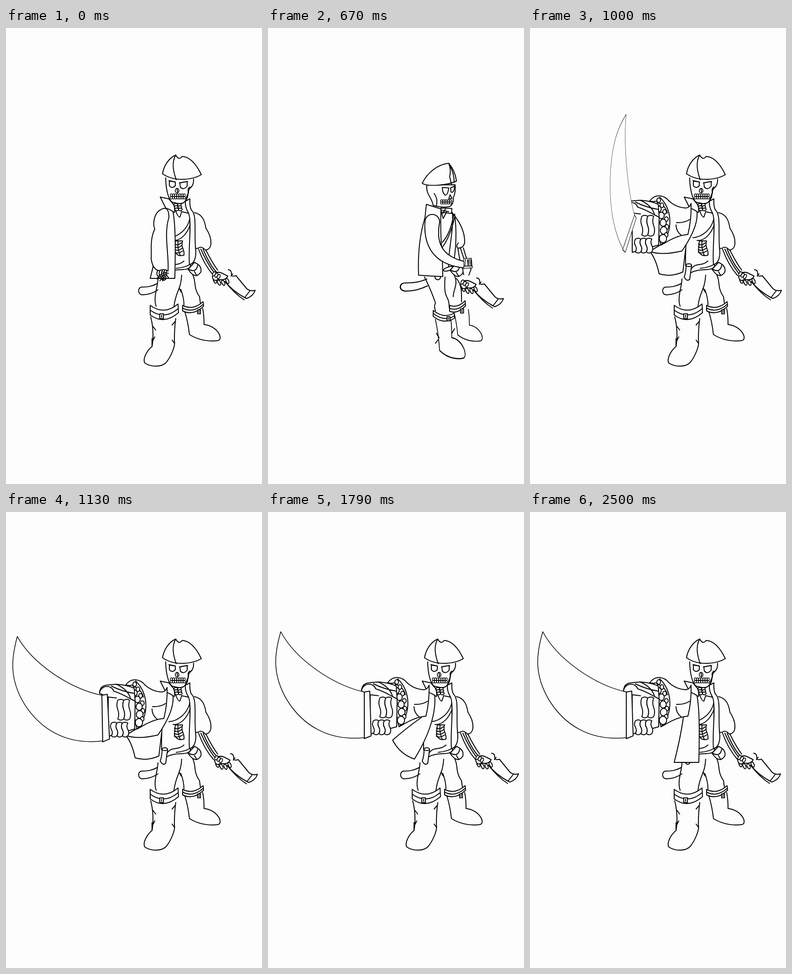
Recreate the animation shown at these times as an HTML page with a canvas. Size 561x998 px, loop 2960 ms.

```html
<!DOCTYPE html>
<html lang="en">
<head>
<meta charset="utf-8">
<title>Skeleton pirate</title>
<style>
html, body { margin: 0; width: 100%; height: 100%; overflow: hidden; background: #fdfdfd; }
canvas { display: block; }
</style>
</head>
<body>
<canvas id="stage" width="561" height="998"></canvas>
<script>
const ctx = document.getElementById('stage').getContext('2d');
const INK = '#000', PAPER = '#fdfdfd', LOOP = 2960, STEP = 1000 / 24;

const mix = (a, b, k) => a + (b - a) * k;
const mixPoint = (a, b, k) => [mix(a[0], b[0], k), mix(a[1], b[1], k)];
const span = (n, from, to) => {
  const k = Math.max(0, Math.min(1, (n - from) / (to - from)));
  return k * k * (3 - 2 * k);
};
const repeat = (count, paint) => { for (let i = 0; i < count; i++) paint(i, i / (count - 1)); };

function ink(path, filled = false, width = 2) {
  const shape = path instanceof Path2D ? path : new Path2D(path);
  ctx.lineWidth = width;
  if (filled) ctx.fill(shape);
  ctx.stroke(shape);
}
const solid = path => ink(path, true);

function oval(x, y, rx, ry, width = 2, turn = 0) {
  const path = new Path2D();
  path.ellipse(x, y, rx, ry, turn, 0, 7);
  ink(path, true, width);
}

function at(x, y, sx, sy, paint) {
  ctx.save();
  ctx.translate(x, y);
  ctx.scale(sx, sy);
  paint();
  ctx.restore();
}

// A tapering outlined tube along a quadratic bend.
function limb(a, b, c, startRadius, endRadius) {
  for (const [color, grow] of [[INK, 1], [PAPER, -1]]) {
    ctx.fillStyle = color;
    repeat(60, (i, u) => {
      const [x, y] = mixPoint(mixPoint(a, b, u), mixPoint(b, c, u), u);
      ctx.beginPath();
      ctx.arc(x, y, mix(startRadius, endRadius, u) + grow, 0, 7);
      ctx.fill();
    });
  }
}

function teeth(x, y, count, w, h) {
  for (const row of [.5, 1.5])
    repeat(count, i => oval(x + (i + .5) * w, y + row * h, w / 2, h / 2, 1.4));
}

function fingers(x, y, w, h, count) {
  repeat(count, i => solid(`M${x + i * w} ${y}q-4 ${h / 4} 0 ${h / 2}t0 ${h / 2}q${w / 2} 5 ${w} 0
    q4 ${-h / 4} 0 ${-h / 2}t0 ${-h / 2}q${-w / 2} -4 ${-w} 0z`));
}

function boot() {
  solid('M0 0Q8 25 11 53C35 68 60 68 74 66C86 62 72 34 43 31Q43 10 40 -4');
}

function cuff(x1, y1, x2, y2, height, sag, buckle) {
  const mid = (x1 + x2) / 2, low = (y1 + y2) / 2 + sag;
  solid(`M${x1} ${y1}Q${mid} ${low} ${x2} ${y2}l1 ${height - 2}Q${mid} ${low + height} ${x1} ${y1 + height}Z`);
  ink(`M${x1} ${y1 + height / 2}Q${mid} ${low + height / 2} ${x2} ${y2 + height / 2}`);
  const w = 4 + height / 5, x = mix(x1, x2, buckle) - w / 2, y = (y1 + low) / 2 + height * .35;
  solid(`M${x} ${y}h${w}v${w + 2}h${-w}z`);
  ink(`M${x + w / 2} ${y + 3}v${w - 4}`);
}

function scabbard() {
  solid('M42 -8C29 -1 20 0 8 0C-2 0 -2 17 9 17Q27 17 43 6');
}

function pouch() {
  solid('M413 513Q430 520 427 534Q415 552 399 528Z');
  ink('M400 528Q417 537 420 519M413 533L418 542');
}

function gunHand() {
  solid(`M490 528Q498 528 497 541Q500 543 507 541L530 569Q537 576 549 573Q545 586 530 591
    L526 589Q500 575 483 554`);
  ink('M483 554Q503 580 525 594M496 542L500 537M537 575L526 589');
  repeat(4, (i, u) => oval(461 + 9 * i, 552 + 5 * Math.sin(u * 3), 3, 6, 2, -.4));
  solid('M455 543Q462 530 475 535L489 542Q484 553 468 549Q458 556 455 543Z');
  repeat(3, i => oval(459 + 5 * i, 537 + 3 * i, 3, 5, 1.8, .5));
}

function neckAndScarf(x, y) {
  repeat(3, i => oval(x - 4 + i, y + 5 * i, 4, 3));
  repeat(3, i => oval(x + 4 + i, y + 5 * i, 4, 3));
}

function ribs() {
  solid('M371 466L387 466C382 480 392 484 390 497Q376 502 369 488Z');
  ink('M377 467Q375 482 382 498');
  repeat(4, i => ink(`M369 ${473 + 6 * i}q8 4 ${15 + i} -3`));
}

function frontLegs() {
  at(290, 567, 1, 1, scabbard);
  ink(`M333 549C333 565 322 590 329 609M385 541C383 575 372 575 368 610M379 569l5 9
    M383 572Q390 590 390 606M404 530C420 555 408 565 424 588L426 602`);
  at(391, 618, 1, 1, boot);
  cuff(387, 607, 432, 599, 12, 16, .8);
  solid(`M317 632C322 650 324 675 320 697C309 706 299 724 304 733C318 743 342 742 351 732
    C361 720 372 695 369 685Q369 655 372 636`);
  ink('M320 680v17M369 690l-5-7M371 642l-7 8M322 653l6 8M326 676l-4 8');
  cuff(316, 607, 377, 604, 21, 24, .41);
}

function frontTorso() {
  solid(`M355 390L372 401Q377 414 381 414L385 402L403 406L404 522C398 534 372 524 352 536
    L341 520Q340 480 345 440Z`);
  ink('M404 410C400 445 372 458 357 459M405 427C396 455 380 466 366 465');
  ink('M350 533C360 510 375 524 390 510M373 526Q392 524 402 518');
  ribs();
  solid('M342 520Q342 534 338 545Q344 556 350 550Q352 535 354 520Z');
  oval(348, 519, 6, 3);
}

function frontArm(gunX, gunY) {
  repeat(4, i => ink(`M${422 + 5 * i} 484Q${434 + 6 * i} ${518 - 4 * (i % 2)} ${455 + 3 * i} ${542 - 4 * i}`));
  solid('M413 404C432 408 436 425 438 438C454 462 452 485 437 486Q428 476 421 482L414 483');
  at(gunX, gunY, 1, 1, gunHand);
  pouch();
  solid(`M403 374Q402 390 406 398C420 410 411 450 416 490Q416 514 402 518
    C399 480 408 425 400 405Q392 392 393 379Z`);
}

function frontHead() {
  neckAndScarf(376, 387);
  solid('M350 328C350 350 356 382 368 382Q388 388 393 378C402 370 396 358 403 351Q412 344 411 331');
  ink('M403 348Q397 352 400 360Q396 368 394 376M357 334l14 3M380 339l18-3');
  solid('M358 335L371 337V345Q364 353 358 345ZM381 339L397 336V346Q389 356 382 348Z');
  oval(375, 356, 4, 5, 1.8);
  ink('M375 353l1 6');
  teeth(360, 363, 7, 4.7, 5.7);
  solid('M343 319C346 300 358 284 372 278Q379 291 386 281C404 282 418 300 428 321C410 332 370 338 343 319Z');
  ink('M372 278C362 295 367 315 373 332');
}

function drawFront(gunX, gunY) {
  frontLegs();
  frontTorso();
  frontArm(gunX, gunY);
  frontHead();
}

// The loose coat front hangs between the collar and two moving corners.
const blown = [[333, 488], [262, 489]], falling = [[320, 545], [274, 500]], hanging = [[370, 548], [316, 548]];

function coatFlap(from, to, k, sag) {
  const [[x1, y1], [x2, y2]] = from.map((corner, i) => mixPoint(corner, to[i], k));
  solid(`M357 374C372 400 372 ${(374 + y1) / 2} ${x1} ${y1}
    Q${(x1 + x2) / 2 - 8 * sag} ${(y1 + y2) / 2 + 10 * sag} ${x2} ${y2}
    Q${(x2 + 336) / 2 + 4} ${(y2 + 450) / 2 - 6} 336 450`);
  solid('M338 370L357 374L367 386Q371 395 369 404Q358 396 350 394Z');
}

function drawIdle() {
  drawFront(-3, 1);
  coatFlap(hanging, hanging, 0, 0);
  repeat(5, i => ink(`M${333 + 5 * i} 530q-5 8 0 13t${i - 2} ${6 + 5 * Math.sin(i)}M${332 + 3 * i} ${546 - 3 * i}l12 3`));
  solid(`M355 532C358 500 345 450 357 415Q357 392 345 395C322 402 322 430 326 440
    C314 465 320 490 318 505Q322 530 336 531Q348 526 355 532`);
}

function sideBody() {
  at(289, 558, 1.4, 1.05, scabbard);
  at(407, 620, .8, .98, boot);
  cuff(398, 607, 432, 597, 13, 12, .8);
  ink(`M343 545Q358 575 367 602Q363 608 367 619M388 545C384 600 397 580 397 612
    M405 535C420 560 406 570 406 588M413 548C426 565 424 580 424 599`);
  oval(372, 545, 6, 6);
  at(367, 638, .83, 1.28, boot);
  ink('M369 668l6 10M373 682l-6 8M409 658l-6 10');
  cuff(362, 618, 408, 624, 13, 16, .73);
  solid('M402 403C418 420 432 445 431 470Q428 482 416 482Q411 478 417 470');
  ink(`M404 404C408 440 394 490 396 522M409 407Q416 460 406 520M407 408Q400 450 382 469
    M409 414Q400 455 382 480M416 482Q420 510 429 540M428 481Q436 510 445 528L440 541M422 482Q428 505 438 522`);
  oval(396, 527, 12, 4, 2, -.3);
  at(0, 2, 1, 1, pouch);
  at(-33, 19, 1, 1, gunHand);
}

function sideHead() {
  solid('M348 344C346 365 358 368 362 388Q380 394 398 391Q407 386 406 372Q412 358 410 343Z');
  ink('M364 362Q373 374 369 390');
  solid('M382 349L396 350Q394 366 388 366Q382 360 382 349ZM400 350L409 346Q408 362 401 359Z');
  solid('M399 365L396 374L403 373Z');
  teeth(378, 376, 5, 4.9, 4.7);
  solid('M338 340C348 318 372 298 396 296Q410 312 413 335C395 344 350 348 338 340Z');
  ink('M396 296Q402 312 398 325L402 342M398 300Q408 318 408 338');
  solid('M347 386L379 396Q377 450 382 500L383 544Q356 543 330 541Q327 470 344 415Z');
  solid('M379 394L403 395L402 406L380 403Z');
  ink('M380 404l4 13l7 -14M382 399l14 3M389 396l-6 10');
}

function fist(bladeLength) {
  at(-454, -381, 1, 1, () => {
    if (bladeLength) at(0, 397 * (1 - bladeLength), 1, bladeLength, () => solid('M446 397Q450 445 437 497Q462 460 463 397Z'));
    solid('M440 365L466 364L468 390L441 391ZM440 390h29v6l-29 2z');
    repeat(4, i => oval(460, 371 + 5 * i, 6, 3, 2, -.1));
    ink('M446 367l-2 22M452 368l3 20');
  });
}

function drawSide(n) {
  sideBody();
  sideHead();
  const grab = span(n, 11, 15), lift = span(n, 16, 21);
  const elbow = mixPoint(mixPoint([361, 470], [350, 505], grab), [350, 376], lift);
  const wrist = mixPoint(mixPoint([363, 520], [430, 518], grab), [436, 385], lift);
  limb([360, mix(424, 434, lift)], elbow, wrist, mix(16, 14, lift), mix(7, 12, lift));
  ctx.fillStyle = PAPER;
  const size = mix(.65, 1, lift);
  at(wrist[0] + mix(8, 18, lift), wrist[1] - 3, size, size, () => fist(lift));
}

function reachingArm() {
  solid(`M262 374C275 355 295 362 304 373Q320 388 342 389Q350 388 353 379Q354 415 346 447
    Q325 448 298 464L287 470Q275 420 283 400Z`);
  ink('M284 365C312 390 315 440 287 470M321 421Q338 422 350 414M320 426Q320 440 332 449M262 374Q295 375 301 400');
  repeat(6, (i, u) => {
    const x = 275 + 18 * Math.sin(u * 2), y = 380 + 76 * u ** 1.2;
    oval(x + 7, y - 8, 4, 5);
    oval(x, y, 5 + 3 * u, 6 + 3 * u);
  });
  solid('M205 392C205 370 225 374 242 372Q268 374 281 381L283 409L282 470L224 486V400Z');
  ink(`M205 390C210 372 232 374 236 387Q252 392 273 404M231 376Q255 388 281 392
    M242 372Q268 384 273 404L283 409M224 400l18 2`);
  fingers(245, 407, 13, 41, 2);
  fingers(231, 457, 12, 28, 3);
}

function drawReach(n) {
  const settle = 1 - span(n, 27, 32), swing = 1 - span(n, 24, 27);
  const fall = span(n, 37, 43), hang = span(n, 43, 49);
  drawFront(2 * settle, settle);
  if (fall < .8) {
    solid(`M262 488Q${272 + 4 * settle} 505 283 ${526 + 12 * settle}Q308 ${518 + 28 * settle} 335 534L341 484`);
  }
  if (hang) coatFlap(falling, hanging, hang, 1 - hang);
  else coatFlap(blown, falling, fall, 1);
  at(0, 5 * settle, 1, 1, () => {
    reachingArm();
    at(218, 445 + 2 * settle, mix(1, .38, swing), 1, () => {
      ctx.rotate(.75 * swing - .018 * settle);
      ctx.translate(-218, -445);
      ink('M211 494C130 502 75 465 42 412C8 355 14 310 28 262C60 322 140 378 211 394', true, 1.5);
      solid('M211 394L223 392L226 490L211 496Z');
    });
  });
}

function render() {
  const n = Math.floor((performance.now() % LOOP) / STEP + .01);
  ctx.fillStyle = PAPER;
  ctx.fillRect(0, 0, 561, 998);
  ctx.strokeStyle = INK;
  ctx.lineCap = ctx.lineJoin = 'round';
  if (n < 12) drawIdle();
  else if (n < 23) drawSide(n);
  else drawReach(n);
  requestAnimationFrame(render);
}
render();
</script>
</body>
</html>
```
